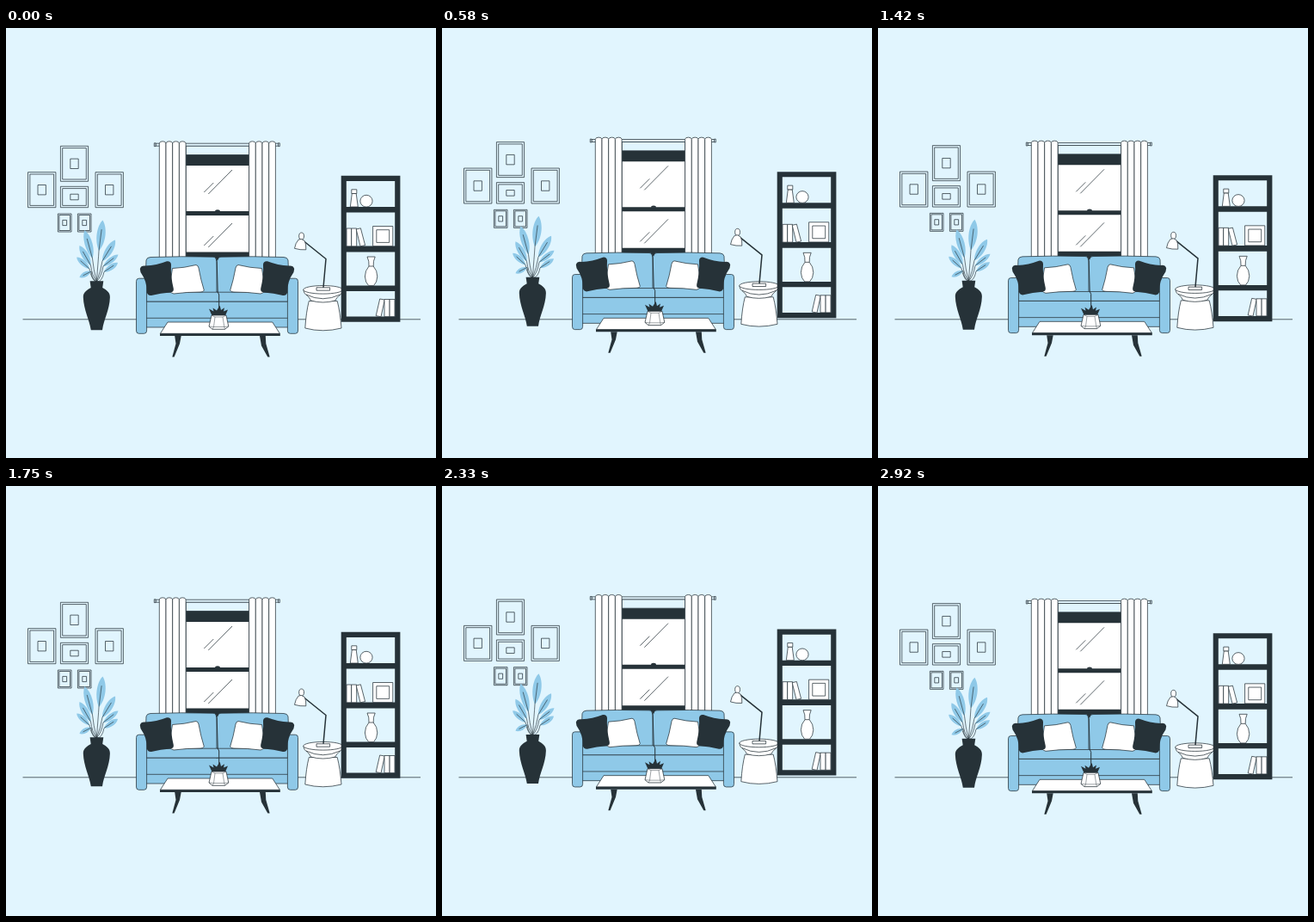
These frames come from a looping animation (500x500 px, 2.96 s). An HTML page with a canvas:

```html
<!DOCTYPE html>
<html lang="en">
<head>
<meta charset="utf-8">
<title>Living room</title>
<style>
  html, body { margin: 0; width: 100%; height: 100%; overflow: hidden; background: #e1f5fe; }
  canvas { display: block; width: 500px; height: 500px; }
</style>
</head>
<body>
<canvas id="stage"></canvas>
<script>
const SIZE = 500, LOOP = 2960, FPS = 24, PERIOD = 1500, LIFT = 6;
const BG = '#e1f5fe', INK = '#263238', BLUE = '#8fc9e8', WHITE = '#fff';
const THIN = 0.75;

const canvas = document.getElementById('stage');
const ctx = canvas.getContext('2d');
const ratio = window.devicePixelRatio || 1;
canvas.width = canvas.height = SIZE * ratio;

function shape(d, fill, stroke = INK, width = THIN) {
  const p = new Path2D(d);
  if (fill) { ctx.fillStyle = fill; ctx.fill(p); }
  if (stroke) { ctx.strokeStyle = stroke; ctx.lineWidth = width; ctx.stroke(p); }
}

function box(x0, y0, x1, y1, fill, stroke = INK) {
  shape(`M${x0} ${y0}H${x1}V${y1}H${x0}Z`, fill, stroke);
}

function oval(x, y, rx, ry, fill) {
  shape(`M${x - rx} ${y}a${rx} ${ry} 0 1 0 ${2 * rx} 0a${rx} ${ry} 0 1 0 ${-2 * rx} 0Z`, fill);
}

// Draws once as is and once reflected in the sofa's centre line
function mirrored(draw) {
  draw();
  ctx.save();
  ctx.translate(491, 0);
  ctx.scale(-1, 1);
  draw();
  ctx.restore();
}

function picture(x, y, w, h, pad, mw, mh) {
  box(x, y, x + w, y + h);
  box(x + pad, y + pad, x + w - pad, y + h - pad);
  const cx = x + w / 2, cy = y + h / 2;
  box(cx - mw / 2, cy - mh / 2, cx + mw / 2, cy + mh / 2);
}

function pictures() {
  picture(63.4, 137.3, 32.2, 41, 2.3, 9.4, 11.4);
  picture(25.5, 167.7, 32.4, 41, 2.3, 9.4, 11.4);
  picture(104, 167.7, 32.4, 41, 2.3, 9.4, 11.4);
  picture(63.4, 184.3, 32.2, 24.4, 2.3, 9.4, 6.6);
  picture(60.4, 216, 15.6, 21, 1.5, 4.8, 6.2);
  picture(83.4, 216, 15.6, 21, 1.5, 4.8, 6.2);
}

function curtain(x) {
  const w = 7.7;
  for (let i = 0; i < 4; i++) {
    const a = x + i * w, b = a + w;
    shape(`M${a} 268V134Q${a + 0.4} 131.8 ${a + w / 2} 131.8Q${b - 0.4} 131.8 ${b} 134V268`, WHITE);
  }
}

function glare(y) {
  shape(`M235.3 ${y + 28}L263 ${y}M230.3 ${y + 26}L241.3 ${y + 15}`);
}

function windowPane() {
  box(209.3, 137, 282.7, 268, BG);
  box(209.3, 147.5, 282.7, 267.5, INK);
  box(209.6, 160, 282.4, 213, WHITE, null);
  box(209.6, 218, 282.4, 260.5, WHITE, null);
  shape('M243 213.5Q243 211.2 246 211.2Q249 211.2 249 213.5Z', INK, null);
  glare(165);
  glare(227);
  box(174, 134.2, 317, 137.2, BG);
  box(172.3, 133.8, 174, 137.6, BG);
  box(316.6, 133.8, 318.3, 137.6, BG);
  curtain(178.3);
  curtain(282.6);
}

function leaf(bx, by, tx, ty, w) {
  const dx = tx - bx, dy = ty - by, len = Math.hypot(dx, dy);
  const nx = -dy / len * w, ny = dx / len * w;
  const at = (k, s) => `${bx + dx * k + nx * s} ${by + dy * k + ny * s}`;
  shape(`M${bx} ${by}C${at(0.25, 0.7)} ${at(0.75, 0.75)} ${tx} ${ty}C${at(0.8, -0.65)} ${at(0.3, -0.7)} ${bx} ${by}Z`, BLUE, null);
  shape(`M105.3 295Q${bx + (105 - bx) * 0.25} ${by + 12} ${bx} ${by}L${at(0.7, 0)}`, null, INK, 0.65);
}

function plant() {
  leaf(108, 259, 112.5, 223.5, 9.5);
  leaf(100.5, 268, 91.5, 235, 8.5);
  leaf(112, 271, 127, 246.5, 8);
  leaf(98.5, 276, 85.5, 253, 7.5);
  leaf(113, 277, 130.5, 263.5, 6);
  leaf(97, 280, 82.2, 266.5, 6);
  leaf(114, 283.5, 130, 273, 6);
  leaf(99, 283, 85.5, 290, 5.5);
  shape('M97.6 294.3H113.3L112.2 302C117 304.5 121 307.5 120.9 313C120.5 328 113.5 339 112 351.3H98.8C97 339 90.3 328 89.8 313C89.7 307.5 94 304.5 98.7 302Z', INK, null);
}

function sofa() {
  box(161, 318, 330, 348, BLUE);
  shape('M163 337.3H328');
  mirrored(() => shape('M246 307V270Q245.5 266.2 241 266.2Q203 265.2 168 266.5Q163.7 266.7 163 270L161.5 310H246Z', BLUE));
  mirrored(() => shape('M246.5 307.2H163V318H246.5', BLUE));
  shape('M243.5 266.5L245.2 271.5L246.2 307L247.7 310V330', null, INK, 1);
  shape('M243 266.2H248L246 270.5Z', INK, null);
  mirrored(() => {
    shape('M151.5 294.5Q151.5 291.2 154.5 291.2H160.5Q163.6 291.2 163.6 294.5V352Q163.6 355.3 160.5 355.3H154.5Q151.5 355.3 151.5 352Z', BLUE);
    shape('M193.5 279.5Q207 279 221 275.5Q223.5 276 224 279Q226.5 293 230.3 305Q229.5 307.2 226 307Q210 307 195 309Q189 307 190 303Z', WHITE);
    shape('M155.8 280Q157 276 162 276.6Q175 276 187 271.3Q191.5 270.7 192 275Q191.2 288 194.8 303Q195.5 307 191 307.5Q180 308 169 311Q164.7 311.5 163.7 307Q164.3 295 156.5 284Z', INK, null);
  });
}

function coffeeTable() {
  shape('M196.2 358H203.7L202 367L195.6 382.5H193.3L197.5 367Z', INK, null);
  shape('M295 358H301.8L302.3 367L306.7 382.5H304.3L297 369.5Z', INK, null);
  shape('M188 342H309.8L318.4 355.3H179.4Z', WHITE);
  box(179, 355.2, 318.8, 358, INK, null);
  shape('M240 335.5L236 326.5L241.5 329.5L240.5 325.5L245 328.5L248.7 322.7L250 328L254 325.2L253 329.5L258 327.5L254.5 335.5Z', INK, null);
  shape('M239 334H256L258.8 347L254.5 350.3H240L236 347Z', WHITE);
  shape('M239 334L243 336L241.5 347.5L236 347M243 336H252L253.8 347.5H241.5M256 334L252 336M253.8 347.5L258.8 347M241.5 347.5L240 350.3M253.8 347.5L254.5 350.3', null, INK, 0.45);
}

function lampTable() {
  shape('M352.3 317.5Q349 330 347.8 349Q368.5 354.5 390 349Q388.5 330 385.2 317.5Z', WHITE);
  shape('M345.8 304.5Q346 309 350.5 311.5Q353 313.5 354.5 317Q368.5 321 382.8 317Q384.5 313.5 387 311.5Q391.3 309 391.6 304.5Z', WHITE);
  shape('M349 310Q368.5 319.5 388.5 310');
  oval(368.7, 304.3, 22.9, 4.8, WHITE);
  box(361, 301.8, 376.6, 305.2, WHITE);
  shape('M369 301.8L372 268.5L346.5 248', null, INK, 1.5);
  oval(343.6, 242, 2.9, 4, WHITE);
  shape('M340.2 246Q343.5 244.3 347 247.3Q349.3 251 348.8 257.8Q342 258.3 335.5 256.3Q336.5 250 340.2 246Z', WHITE);
}

function shelf() {
  box(389.7, 171.8, 458.4, 341.8, INK, null);
  for (const [top, bottom] of [[178, 208], [214.4, 253.6], [260.4, 299.6], [306, 335.6]]) {
    box(395.8, top, 452.2, bottom, BG, null);
  }
  shape('M402.3 192.5L400.3 208H409.3L407.2 192.5Z', WHITE);
  box(401.8, 187.8, 407.8, 192.5, WHITE);
  oval(419, 201.2, 7.1, 6.9, WHITE);

  box(396, 233, 401.7, 253.8, WHITE);
  box(401.7, 233, 407.7, 253.8, WHITE);
  shape('M407.2 234L412.4 232.8L417.6 252.6L412 253.8Z', WHITE);
  box(426.6, 230.5, 449.8, 253.6, WHITE);
  box(430.8, 234.7, 445.7, 249.4, WHITE);

  shape('M420 266H429.2Q426.7 271 427.2 277Q431.8 282 431.8 289Q431.5 296 427.5 299.6H421.7Q417.7 296 417.4 289Q417.4 282 422 277Q422.5 271 420 266Z', WHITE);
  shape('M422 277H427.2');

  shape('M434.7 315L440.3 316L436 335.8L430.2 334.6Z', WHITE);
  box(440, 315.5, 446.1, 335.6, WHITE);
  box(446.1, 315.5, 452, 335.6, WHITE);
}

function draw(ms) {
  const step = Math.floor((ms + 5) * FPS / 1000);
  const phase = (step * 1000 / FPS % PERIOD) / PERIOD;
  const rise = LIFT * (1 - Math.abs(1 - 2 * phase));

  ctx.setTransform(ratio, 0, 0, ratio, 0, 0);
  ctx.fillStyle = BG;
  ctx.fillRect(0, 0, SIZE, SIZE);
  ctx.lineJoin = 'round';
  shape('M19.5 338.8H482');

  ctx.translate(0, -rise);
  pictures();
  windowPane();
  plant();
  sofa();
  lampTable();
  shelf();
  coffeeTable();
}

const start = performance.now();
function tick() {
  draw((performance.now() - start) % LOOP);
  requestAnimationFrame(tick);
}
tick();
</script>
</body>
</html>
```
